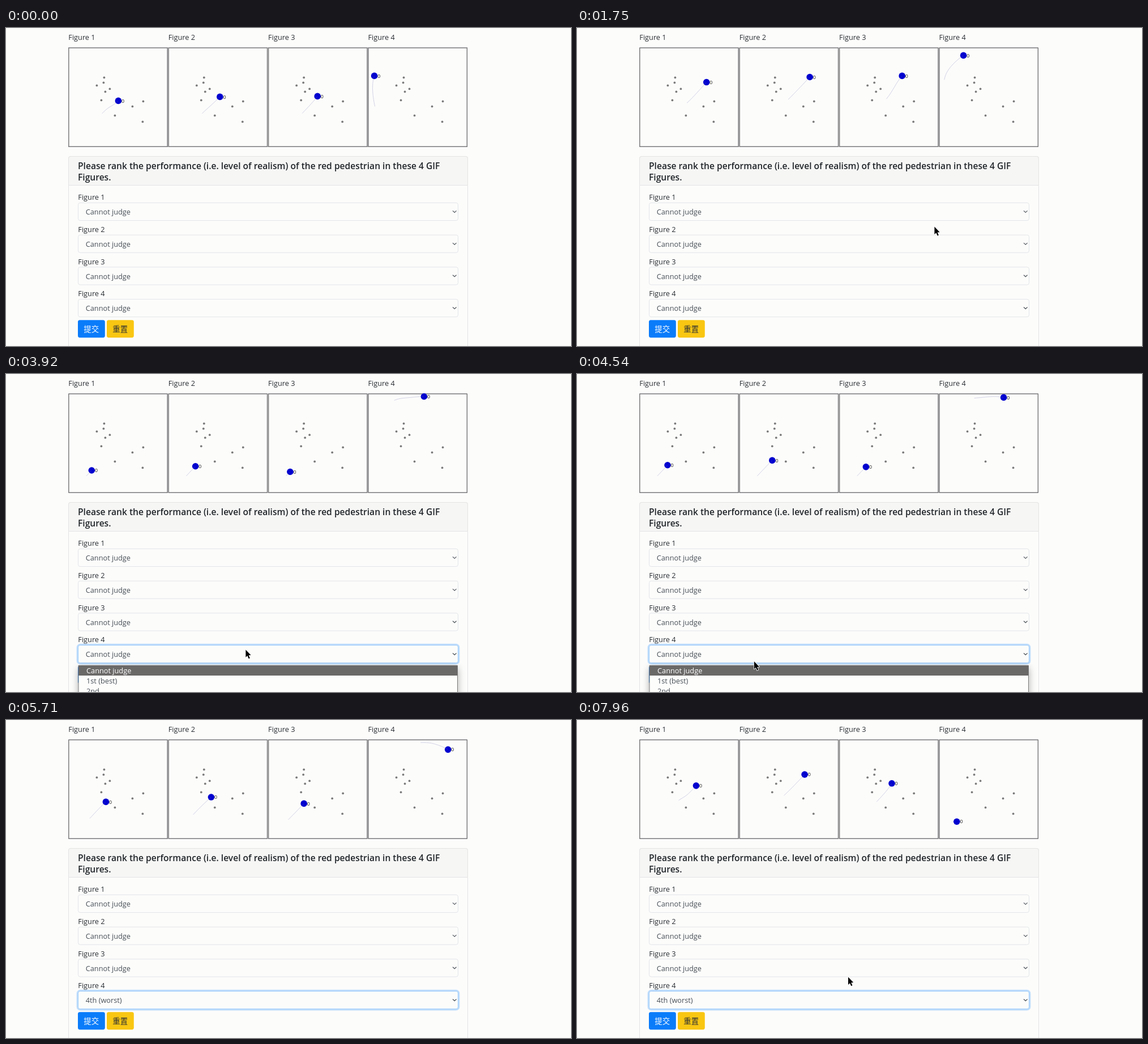
Recreate the animation shown at these times as an HTML page with a canvas. Size 998x561 px, loop 8 s.

```html
<!DOCTYPE html>
<html lang="en">
<head>
<meta charset="utf-8">
<title>Ranking survey</title>
<style>
  html, body { margin: 0; width: 100%; height: 100%; overflow: hidden; background: #fcfcfb; }
  canvas { display: block; width: 998px; height: 561px; }
</style>
</head>
<body>
<canvas id="stage" width="998" height="561"></canvas>
<script>
const ctx = document.getElementById('stage').getContext('2d');
const LOOP = 8000, TRAIL = 2030;
const PAGE = '#fcfcfb', INK = '#2b2f33', MUTED = '#495057';
const SANS = '"Open Sans", "Noto Sans", sans-serif';
const BODY = '12.75px ' + SANS;
const HEAD = '600 15.6px ' + SANS;
const CJK = '13.4px "Noto Sans CJK SC", "Noto Sans CJK", sans-serif';

const PANEL = { x: 110, y: 34.9, step: 176.4, size: 174.4 };
const OBSTACLES = [[63, 87], [62, 96], [50, 101], [73, 107], [65, 112],
                   [58, 127], [132, 129], [113, 138], [82, 154], [131, 165]];

// Walkers leave the same spot and restart when their path ends.
// Keys are [age in ms, x inside the panel, y]; "age" is the age at time zero.
const START = [0, 31.5, 179.5];
const WALKERS = [
  { age: 4000, path: [START, [2460, 66, 144], [4000, 88, 128], [7250, 145, 65]] },
  { age: 3720, path: [START, [1590, 58, 152], [3720, 91, 121], [6670, 148, 61]] },
  { age: 4130, path: [START, [2320, 63, 147], [4130, 87, 120], [5880, 111, 84], [7520, 141, 60]] },
  { age: 4000, path: [START, [1970, 12, 138], [4000, 11, 84], [5750, 43, 48], [7000, 75, 41],
                      [8540, 114, 41], [10330, 152, 60], [11930, 160, 90]] }
];

const POINTER = [[560, 830, 566], [900, 730, 358], [1750, 631.5, 350.5], [2350, 611, 520], [3000, 597, 482],
                 [4540, 313, 507], [5200, 300, 590], [5850, 400, 565], [6330, 488, 450.5], [6600, 479, 453.5]];
const FOCUS_AT = 3290, OPEN_AT = 3380, PICK_AT = 5350;
const OPTIONS = ['Cannot judge', '1st (best)', '2nd', '3rd', '4th (worst)'];

const clamp = (v, lo, hi) => Math.min(hi, Math.max(lo, v));

function slope(keys, i, axis) {
  const a = keys[Math.max(0, i - 1)], b = keys[Math.min(keys.length - 1, i + 1)];
  return (b[axis] - a[axis]) / (b[0] - a[0]);
}

// Smooth cubic position along timed keys.
function at(keys, t) {
  t = clamp(t, keys[0][0], keys[keys.length - 1][0]);
  let i = 0;
  while (i < keys.length - 2 && t > keys[i + 1][0]) i++;
  const a = keys[i], b = keys[i + 1], d = b[0] - a[0], u = (t - a[0]) / d;
  const u2 = u * u, u3 = u2 * u;
  return [1, 2].map(k =>
    (2 * u3 - 3 * u2 + 1) * a[k] + (u3 - 2 * u2 + u) * d * slope(keys, i, k) +
    (3 * u2 - 2 * u3) * b[k] + (u3 - u2) * d * slope(keys, i + 1, k));
}

function text(str, x, y, font, color) {
  ctx.font = font;
  ctx.fillStyle = color;
  ctx.fillText(str, x, y);
}

function disc(x, y, r, color) {
  ctx.fillStyle = color;
  ctx.beginPath();
  ctx.arc(x, y, r, 0, 7);
  ctx.fill();
}

function box(x, y, w, h, r, fill, stroke, line = 1) {
  ctx.beginPath();
  ctx.roundRect(x, y, w, h, r);
  if (fill) { ctx.fillStyle = fill; ctx.fill(); }
  if (stroke) { ctx.strokeStyle = stroke; ctx.lineWidth = line; ctx.stroke(); }
}

function polyline(points, color, width) {
  ctx.beginPath();
  points.forEach(p => ctx.lineTo(...p));
  ctx.strokeStyle = color;
  ctx.lineWidth = width;
  ctx.stroke();
}

function drawWalker({ age, path }, t) {
  const now = (age + t) % path[path.length - 1][0];
  const from = Math.max(now - TRAIL, 0);
  const [x, y] = at(path, now);
  disc(x, y, 5.8, '#0000cf');
  const trail = Array.from({ length: 41 }, (_, i) => at(path, from + (now - from) * i / 40));
  polyline(trail, 'rgba(120,120,185,.32)', 1);
  text('0', x + 5.6, y + 3.2, '9px "Liberation Sans", Arial, sans-serif', '#333');
}

function drawPanels(t) {
  WALKERS.forEach((walker, i) => {
    ctx.save();
    ctx.translate(PANEL.x + i * PANEL.step, 0);
    text('Figure ' + (i + 1), .3, 21, BODY, INK);
    box(.8, PANEL.y, PANEL.size, PANEL.size, 0, PAGE, '#7a7a7d', 1.5);
    ctx.translate(.4, .4);
    OBSTACLES.forEach(([x, y]) => disc(x, y, 1.9, '#7b7b7b'));
    drawWalker(walker, t);
    ctx.restore();
  });
}

function drawSelect(i, value, focus) {
  const y = 308.4 + i * 56.7;
  text('Figure ' + (i + 1), 127.3, y - 5.2, BODY, INK);
  if (focus) {
    ctx.globalAlpha = focus;
    box(126.2, y - 1.2, 673.6, 33.6, 5, null, '#bfddfb', 3.2);
    ctx.globalAlpha = 1;
  }
  box(127.5, y, 671, 31.2, 3.4, PAGE, focus ? '#9ccbfa' : '#e3e5e8');
  text(value, 140.7, y + 20.7, BODY, MUTED);
  polyline([[789, y + 14], [792.3, y + 17], [795.6, y + 14]], '#50565c', 1.2);
}

function drawButton(x, label, fill, color) {
  box(x, 515.2, 47.8, 31, 3.4, fill);
  text(label, x + 10.3, 536, CJK, color);
}

function drawForm(t) {
  box(110.5, 226.5, 705, 400, 3.4, PAGE, '#e4e4e4');
  box(110.5, 226.5, 705, 51, [3.4, 3.4, 0, 0], '#f6f6f5', '#e4e4e4');
  text('Please rank the performance (i.e. level of realism) of the red pedestrian in these 4 GIF',
       127, 249, HEAD, '#212529');
  text('Figures.', 127, 269, HEAD, '#212529');
  for (let i = 0; i < 4; i++) {
    const active = i === 3;
    drawSelect(i, OPTIONS[active && t >= PICK_AT ? 4 : 0],
               active ? clamp((t - FOCUS_AT) / 150, 0, 1) : 0);
  }
  drawButton(127, '提交', '#0a7cfa', '#fff');
  drawButton(178, '重置', '#f9c612', INK);
}

function drawMenu(pointerY) {
  const x = 128, top = 514, width = 669.5, row = 18.1, height = row * OPTIONS.length + 3;
  const hover = clamp(Math.floor((pointerY - top) / row), 0, OPTIONS.length - 1);
  ctx.save();
  ctx.shadowColor = 'rgba(0,0,0,.32)';
  ctx.shadowBlur = 12;
  ctx.shadowOffsetY = 5;
  box(x, top, width, height, 0, '#fff');
  ctx.restore();
  box(x, top + .3, width, height, 0, '#fdfdfc', '#7c7c7c');
  box(x, top + hover * row, width, row, 0, '#6b6968');
  OPTIONS.forEach((label, i) =>
    text(label, x + 14, top + 14.2 + i * row, BODY, i === hover ? '#fff' : MUTED));
}

function drawPointer(x, y) {
  const shape = [[0, 0], [0, 13.4], [3, 10.7], [5.3, 15.8], [7.5, 14.8], [5.2, 9.9], [9.2, 9.6], [0, 0]];
  ctx.lineJoin = 'round';
  polyline(shape.map(([px, py]) => [x + px, y + py]), '#fff', 1.6);
  ctx.fillStyle = '#000';
  ctx.fill();
}

function draw(t) {
  ctx.fillStyle = PAGE;
  ctx.fillRect(0, 0, 998, 561);
  drawPanels(t);
  drawForm(t);
  const [x, y] = at(POINTER, t);
  if (t >= OPEN_AT && t < PICK_AT) drawMenu(y);
  if (t >= POINTER[0][0]) drawPointer(x, y);
}

const start = performance.now();
function tick() {
  draw((performance.now() - start) % LOOP);
  requestAnimationFrame(tick);
}
tick();
</script>
</body>
</html>
```
